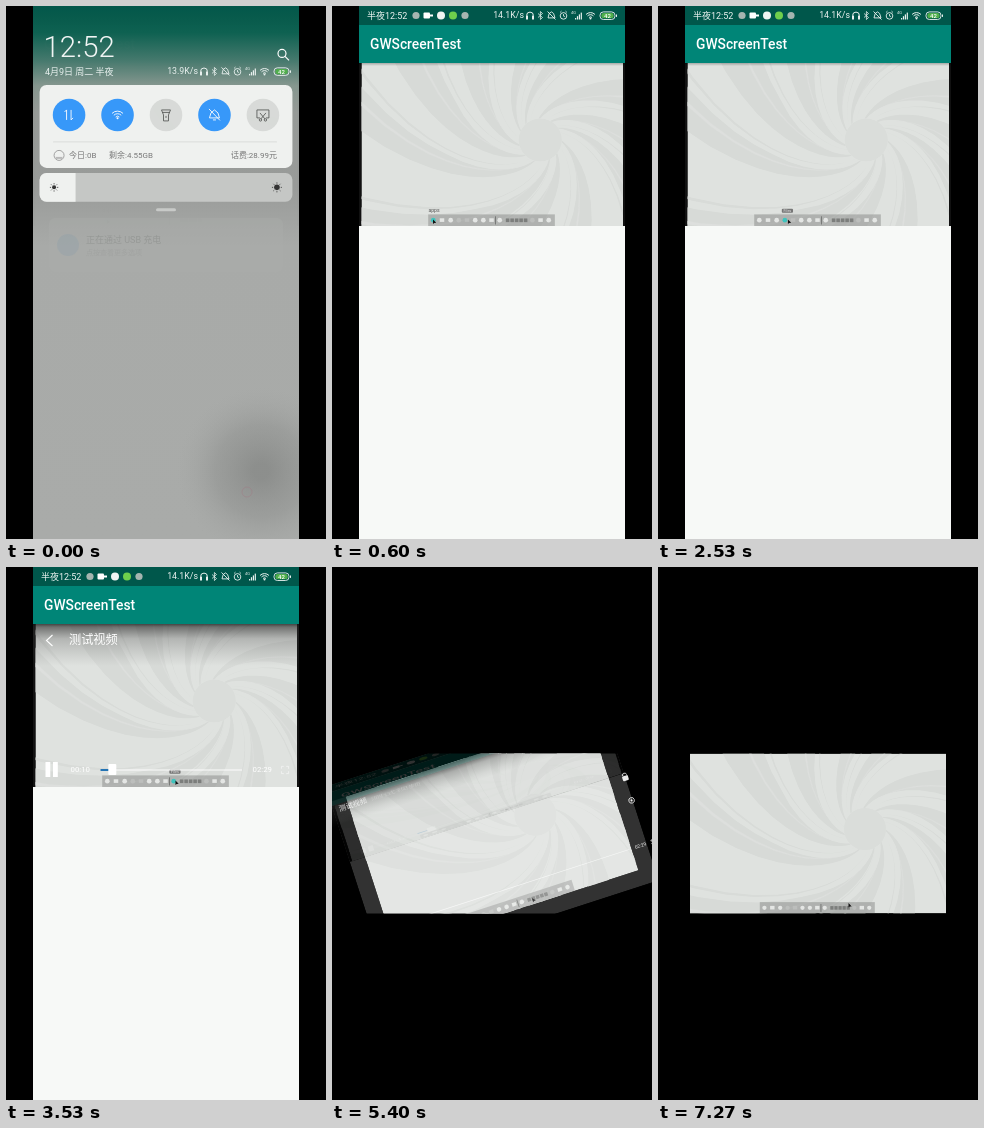
These frames come from a looping animation (320x533 px, 8000 ms). An HTML page with a canvas:

```html
<!DOCTYPE html>
<html lang="zh">
<head>
<meta charset="utf-8">
<style>
html, body { margin: 0; width: 100%; height: 100%; overflow: hidden; background: #000; }
canvas { display: block; width: 320px; height: 533px; }
</style>
</head>
<body>
<canvas id="stage"></canvas>
<script>
const W = 320, H = 533, LOOP = 8000, TAU = Math.PI * 2;
const FONT = 'Roboto, "Noto Sans CJK SC", "Noto Sans CJK", sans-serif';
const dpr = window.devicePixelRatio || 1;
function context(canvas) {
  canvas.width = W * dpr;
  canvas.height = H * dpr;
  return canvas.getContext('2d');
}
let g = context(document.getElementById('stage'));

const clamp = v => Math.max(0, Math.min(1, v));
const ramp = (t, a, b) => clamp((t - a) / (b - a));

function rect(x, y, w, h, c) { g.fillStyle = c; g.fillRect(x, y, w, h); }
function round(x, y, w, h, r, c) {
  g.fillStyle = c;
  g.beginPath(); g.roundRect(x, y, w, h, r); g.fill();
}
function disc(x, y, r, c) {
  g.fillStyle = c;
  g.beginPath(); g.arc(x, y, r, 0, TAU); g.fill();
}
function ring(x, y, r, c, lw = 1, a = 0, b = TAU) {
  g.strokeStyle = c; g.lineWidth = lw;
  g.beginPath(); g.arc(x, y, r, a, b); g.stroke();
}
// Each path is a flat list x, y, x, y...
function lines(c, lw, ...paths) {
  g.strokeStyle = c; g.lineWidth = lw;
  g.beginPath();
  for (const p of paths)
    for (let i = 0; i < p.length; i += 2) i ? g.lineTo(p[i], p[i + 1]) : g.moveTo(p[i], p[i + 1]);
  g.stroke();
}
function text(s, x, y, size, c, weight = 400, align = 'left') {
  g.font = `${weight} ${size}px ${FONT}`;
  g.fillStyle = c; g.textAlign = align; g.textBaseline = 'middle';
  g.fillText(s, x, y);
}
function fade(x, y, w, h, stops) {
  const f = g.createLinearGradient(0, y, 0, y + h);
  stops.forEach(([p, c]) => f.addColorStop(p, c));
  rect(x, y, w, h, f);
}

// Group opacity: draw into a buffer, then blend it once
const buffers = [];
let depth = 0;
function layer(alpha, draw) {
  if (alpha <= 0) return;
  if (alpha >= 1) return draw();
  const base = g;
  g = buffers[depth] ||= context(document.createElement('canvas'));
  depth++;
  g.resetTransform();
  g.clearRect(0, 0, W * dpr, H * dpr);
  g.setTransform(base.getTransform());
  draw();
  depth--;
  const image = g.canvas;
  g = base;
  g.save();
  g.resetTransform();
  g.globalAlpha = alpha;
  g.drawImage(image, 0, 0);
  g.restore();
}

// Desktop recording, 256 x 160 units
const CX = 175, CY = 75.5;
function arm(a, w, c) {
  const pt = (r, off) => {
    const q = a + off + 0.65 * Math.log(r / 20);
    g.lineTo(CX + r * Math.cos(q), CY + r * Math.sin(q));
  };
  g.fillStyle = c;
  g.beginPath();
  for (let i = 0; i <= 16; i++) pt(21 * 1.18 ** i, 0);
  for (let i = 16; i >= 0; i--) pt(21 * 1.18 ** i, w * Math.min(1, 0.25 + i / 12));
  g.fill();
}
function cursorX(t) {
  const keys = [[0, 70], [1800, 70], [3530, 137], [4400, 148], [5100, 146], [5900, 146], [6800, 158.5], [8000, 158.5]];
  const i = keys.findIndex(k => k[0] > t);
  const [a, b] = [keys[i - 1], keys[i]];
  return a[1] + (b[1] - a[1]) * ramp(t, a[0], b[0]);
}
function dock(t) {
  const mx = cursorX(t), out = ramp(t, 6500, 6800), w = 124 - 9 * out;
  const left = 127.3 - w / 2, k = w / 124;
  rect(left, 148.6, w, 11.4, 'rgba(135,137,135,.5)');
  const slots = [5, 13.5, 22, 30, 38, 46, 54, 62, 70, 102, 110, 118];
  slots.forEach((s, i) => {
    const x = left + s * k, near = Math.abs(x - mx) < 4 && out < 1;
    const c = near ? '#3fc4bd' : i == 3 || i == 4 || i == 9 ? '#bcbebc' : '#e4e6e4';
    if (i % 3 == 1) rect(x - 2.2, 152.4, 4.4, 3.6, c);
    else disc(x, 154.3, 2.3 * k, c);
  });
  for (let i = 0; i < 5; i++) rect(left + (76 + i * 4.4) * k, 152.6, 3.5 * k, 3.6, '#7c7e7c');
  rect(left + 65.5 * k, 150.5, .8, 8, '#6c6e6c');
  if (t < 1900) text('apps', mx + 1, 145, 5, '#555', 400, 'center');
  else if (t < 4400) {
    round(mx - 6, 143, 11, 4, 1, '#777');
    text('Files', mx - .5, 145.2, 3.6, '#eee', 400, 'center');
  }
  const y = 153.5 - 4 * out;
  g.fillStyle = '#111';
  g.beginPath();
  g.moveTo(mx, y); g.lineTo(mx, y + 4.6); g.lineTo(mx + 1.2, y + 3.6); g.lineTo(mx + 3.2, y + 3.4);
  g.fill();
}
function video(x, y, w, h, t) {
  g.save();
  g.translate(x, y);
  g.scale(w / 256, h / 160);
  g.beginPath(); g.rect(0, 0, 256, 160); g.clip();
  rect(0, 0, 256, 160, '#dfe2df');
  const n = 11;
  for (let i = 0; i < n; i++) {
    const a = i * TAU / n + 0.08 * Math.sin(i * 2.4), b = 0.28 + 0.07 * Math.sin(i * 1.7);
    arm(a, b, '#d7dad7');
    arm(a + b + .05, .018, '#d8dbd8');
    arm(a + b * .6, .02, '#dddfdd');
  }
  disc(CX, CY, 21, '#dadddA');
  dock(t);
  g.restore();
}

// Player controls
const clock = t => '00:' + Math.min(12, Math.floor(10 + (t - 3200) / 1000));
const played = t => (10 + (t - 3200) / 1000) / 149;
function seek(x0, x1, y, t, k) {
  const x = x0 + (x1 - x0) * played(t);
  rect(x0, y - .6 * k, x1 - x0, 1.2 * k, 'rgba(255,255,255,.75)');
  rect(x0, y - k, x - x0, 2 * k, '#2474b4');
  round(x - 2 * k, y - 6 * k, 8 * k, 11 * k, k, '#fff');
}
function corners(x, y, r) {
  lines('#f4f4f4', .8, [x - r, y - r / 3, x - r, y - r, x - r / 3, y - r], [x + r / 3, y - r, x + r, y - r, x + r, y - r / 3],
    [x - r, y + r / 3, x - r, y + r, x - r / 3, y + r], [x + r / 3, y + r, x + r, y + r, x + r, y + r / 3]);
}
function controls(x, w, top, row, k, t) {
  const right = x + w, X = v => x + v * k;
  fade(x, top, w, 42 * k, [[0, 'rgba(30,30,30,.68)'], [.35, 'rgba(60,60,60,.27)'], [1, 'rgba(90,90,90,0)']]);
  lines('#fff', 1.1 * k, [X(20), top + 11 * k, X(14), top + 16.5 * k, X(20), top + 22 * k]);
  text('测试视频', X(36.5), top + 16.5 * k, 12.2 * k, '#fff');
  rect(X(13), row - 8 * k, 4.8 * k, 15 * k, '#fff');
  rect(X(20.5), row - 8 * k, 4.8 * k, 15 * k, '#fff');
  text(clock(t), X(38), row, 7.8 * k, '#fff');
  seek(X(68), right - 57.5 * k, row, t, k);
  text('02:29', right - 47 * k, row, 7.8 * k, '#fff');
  corners(right - 14.5 * k, row, 3.6 * k);
}

function statusIcons(y, speed) {
  const c = '#e9f1ef';
  text(speed, 192, y + .4, 8.8, c, 400, 'right');
  ring(198, y, 3.4, c, 1, Math.PI, TAU);
  rect(194, y, 2, 4, c); rect(200, y, 2, 4, c);
  lines(c, .8, [206, y - 2, 210.5, y + 2, 208.4, y + 4, 208.4, y - 4, 210.5, y - 2, 206, y + 2]);
  lines(c, .9, [216, y + 2.4, 217.2, y - 2, 219.5, y - 3.6, 221.6, y - 2, 223, y + 2.4, 216, y + 2.4], [215.5, y - 4, 223.5, y + 4]);
  ring(231.5, y + .4, 3.3, c, .9);
  lines(c, .8, [231.5, y - 1.5, 231.5, y + .6, 233, y + 1], [228, y - 3, 229.5, y - 4.4], [235, y - 3, 233.5, y - 4.4]);
  for (let i = 0; i < 4; i++) rect(243 + i * 1.9, y + 2.5 - i * 1.8, 1.2, 1.5 + i * 1.8, c);
  text('4G', 239, y - 2.5, 4, c);
  [2, 4.2, 6.3].forEach(r => ring(258.5, y + 3.4, r, c, 1, Math.PI * 1.25, Math.PI * 1.75));
  disc(258.5, y + 3, 1, c);
  g.strokeStyle = c; g.lineWidth = .9;
  g.beginPath(); g.roundRect(268, y - 3.6, 15, 7.6, 3.4); g.stroke();
  round(269.3, y - 2.4, 12.4, 5.2, 2.4, '#4fae4b');
  text('42', 275.5, y + .5, 6, '#fff', 500, 'center');
  rect(284, y - 1, 1, 2.4, c);
}

function recorder() {
  round(225, 457, 63, 31, 15.5, '#bcbebc');
  disc(241, 472.5, 12, '#d9dbd9');
  ring(241, 472.5, 11, '#f5f5f5', 1.2);
  ring(241, 472.5, 5.5, '#e0524c', 1.2);
  disc(241, 472.5, 3, '#e0524c');
  text('00:54', 260, 473, 9, '#fff');
}

const PX = 27, PW = 266;
function clipPhone() {
  g.beginPath(); g.rect(PX, 0, PW, H); g.clip();
}
function phone(t) {
  g.save();
  clipPhone();
  rect(PX, 0, PW, H, '#f7f9f7');
  rect(PX, 57, PW, 163, '#111');
  video(29.5, 57, 261.5, 163, t);
  layer(ramp(t, 2650, 2900), () => controls(26.5, 267, 57, 203, 1, t));
  rect(PX, 0, PW, 19, '#00574b');
  rect(PX, 19, PW, 38, '#008577');
  fade(PX, 57, PW, 3, [[0, 'rgba(0,0,0,.25)'], [1, 'rgba(0,0,0,0)']]);
  text('GWScreenTest', 38, 38.5, 13.8, '#fff', 500);
  layer(ramp(t, 180, 330), () => {
    text('半夜12:52', 35, 10, 9, '#eef5f3');
    disc(84, 9.5, 3.6, '#a5b5b0');
    round(91.5, 6.5, 6.5, 6, 1, '#fff');
    lines('#fff', 2, [98, 9.5, 101, 9.5]);
    disc(109, 9.5, 4, '#f0f4f2');
    disc(121, 9.5, 4, '#6fcf4c');
    disc(133, 9.5, 3.6, '#a5b5b0');
    statusIcons(9.5, t < 4000 ? '14.1K/s' : '13.7K/s');
  });
  if (t >= 4400) layer(1 - ramp(t, 4650, 4930), recorder);
  g.restore();
}

// Notification shade
function toggleIcons(y) {
  const w = '#fff', d = '#4c4e4c';
  lines(w, .9, [60.5, y + 5, 60.5, y - 5, 58.5, y - 3], [65, y - 5, 65, y + 5, 67, y + 3]);
  [2.6, 5.2, 7.8].forEach(r => ring(111.5, y + 4, r, w, .9, Math.PI * 1.25, Math.PI * 1.75));
  disc(111.5, y + 3.4, 1, w);
  lines(d, .8, [155.5, y - 5, 164.5, y - 5, 162.5, y, 162.5, y + 6, 157.5, y + 6, 157.5, y, 155.5, y - 5],
    [156.5, y - 2.5, 163.5, y - 2.5], [160, y + 1, 160, y + 3]);
  lines(w, .9, [203.5, y + 3, 205, y - 2, 208.5, y - 5, 212, y - 2, 213.5, y + 3, 203.5, y + 3], [207, y + 5, 210, y + 5], [203, y - 6, 214, y + 5.5]);
  lines(d, .8, [254, y + 3, 251, y + 3, 251, y - 5, 263, y - 5, 263, y + 3, 260, y + 3], [254, y - 2, 259, y + 4], [260, y - 2, 255, y + 4]);
  ring(254.5, y + 5, 1.2, d, .8); ring(259.5, y + 5, 1.2, d, .8);
}
function sun(x, y, r) {
  disc(x, y, r, '#333');
  for (let i = 0; i < 8; i++) {
    const c = Math.cos(i * TAU / 8), s = Math.sin(i * TAU / 8);
    lines('#333', .8, [x + c * (r + 1), y + s * (r + 1), x + c * (r + 2.2), y + s * (r + 2.2)]);
  }
}
function shadeHeader() {
  text('12:52', 37.5, 42.3, 29.3, '#f2f6f5', 300);
  text('4月9日 周二 半夜', 39, 66, 9, '#e9f1ef');
  ring(276, 47.5, 4, '#fff', 1.2);
  lines('#fff', 1.2, [279, 50.5, 283, 54.5]);
  statusIcons(65.5, '13.9K/s');
}
function shadeCards() {
  round(33.5, 79, 253, 83, 7, '#f1f3f1');
  for (let i = 0; i < 5; i++) disc(63 + i * 48.5, 109, 16.3, i == 2 || i == 4 ? '#d9dbd9' : '#3698fb');
  toggleIcons(109);
  rect(47, 135.5, 224, 1, '#dcdedc');
  ring(53, 149.5, 5, '#999', .9);
  rect(49.5, 151, 7, 2, '#bbb');
  text('今日:0B', 63, 150, 8, '#777');
  text('剩余:4.55GB', 103, 150, 8, '#777');
  text('话费:28.99元', 271, 150, 8, '#777', 400, 'right');

  round(33.5, 167, 253, 29, 7, '#c6c8c6');
  round(33.5, 167, 36, 29, [7, 0, 0, 7], '#f1f3f1');
  sun(48, 181.5, 2);
  sun(271, 181.5, 2.8);
  round(150, 202.5, 20, 3, 1.5, '#c9cbc9');
}
function shade(u) {
  g.save();
  clipPhone();
  fade(PX, 0, PW, H, [[0, '#04584a'], [.05, '#0f6151'], [.1, '#44786c'], [.15, '#86978f'], [.2, '#969a97'],
    [.34, '#999b99'], [.45, '#a8aaa8'], [1, '#a9aba9']]);
  const b = g.createRadialGradient(255, 465, 8, 255, 465, 84);
  b.addColorStop(0, 'rgba(118,120,118,.55)');
  b.addColorStop(.5, 'rgba(130,132,130,.34)');
  b.addColorStop(1, 'rgba(160,162,160,0)');
  rect(170, 380, 124, 153, b);
  ring(241, 486, 5, 'rgba(170,100,120,.25)');

  g.translate(0, -23 * u);
  shadeHeader();
  layer(1 - 3 * u, () => {
    round(43, 212, 234, 54, 6, 'rgba(172,174,172,.45)');
    disc(62, 239, 11, 'rgba(135,155,170,.3)');
    text('正在通过 USB 充电', 80, 234, 9, 'rgba(115,117,115,.35)');
    text('点按查看更多选项', 80, 247, 7, 'rgba(130,132,130,.2)');
  });
  const s = 1 - .18 * u;
  g.translate(160, 109 + 3 * u);
  g.scale(s, s);
  g.translate(-160, -109);
  layer(1 - u, shadeCards);
  g.restore();
}

function landscape(t) {
  rect(0, 186.5, W, 160, '#000');
  video(32, 186.5, 256, 160, t);
  layer(1 - ramp(t, 6840, 7230), () => {
    controls(0, W, 186.5, 324, .6, t);
    round(301, 252.5, 6, 5, 1, '#e8e8e8');
    ring(304, 252, 2.2, '#e8e8e8', .8, Math.PI, TAU);
    ring(303, 278, 2.8, '#e8e8e8', .8);
    disc(303, 278, 1.1, '#e8e8e8');
  });
}

function turned(angle, sx, sy, draw) {
  g.save();
  g.translate(W / 2, H / 2);
  g.rotate(angle);
  g.scale(sx, sy);
  g.translate(-W / 2, -H / 2);
  draw();
  g.restore();
}

function render(t) {
  g.setTransform(dpr, 0, 0, dpr, 0, 0);
  rect(0, 0, W, H, '#000');
  if (t < 4400) {
    const u = ramp(t, 0, 260);
    phone(t);
    layer((1 - u) ** 2.2, () => shade(u));
    return;
  }
  const p = 1 - (1 - ramp(t, 5080, 5660)) ** 2;
  const angle = -Math.PI / 2 * (1 - p);
  g.save();
  g.beginPath(); g.rect(0, 186.5, W, 160); g.clip();
  if (p > 0) turned(angle, 1, 1, () => landscape(t));
  layer(1 - p, () => turned(angle, (160 + 160 * p) / PW, (320 - 160 * p) / H, () => phone(t)));
  g.restore();
}

const start = performance.now();
function tick() {
  render((performance.now() - start) % LOOP);
  requestAnimationFrame(tick);
}
tick();
</script>
</body>
</html>
```
